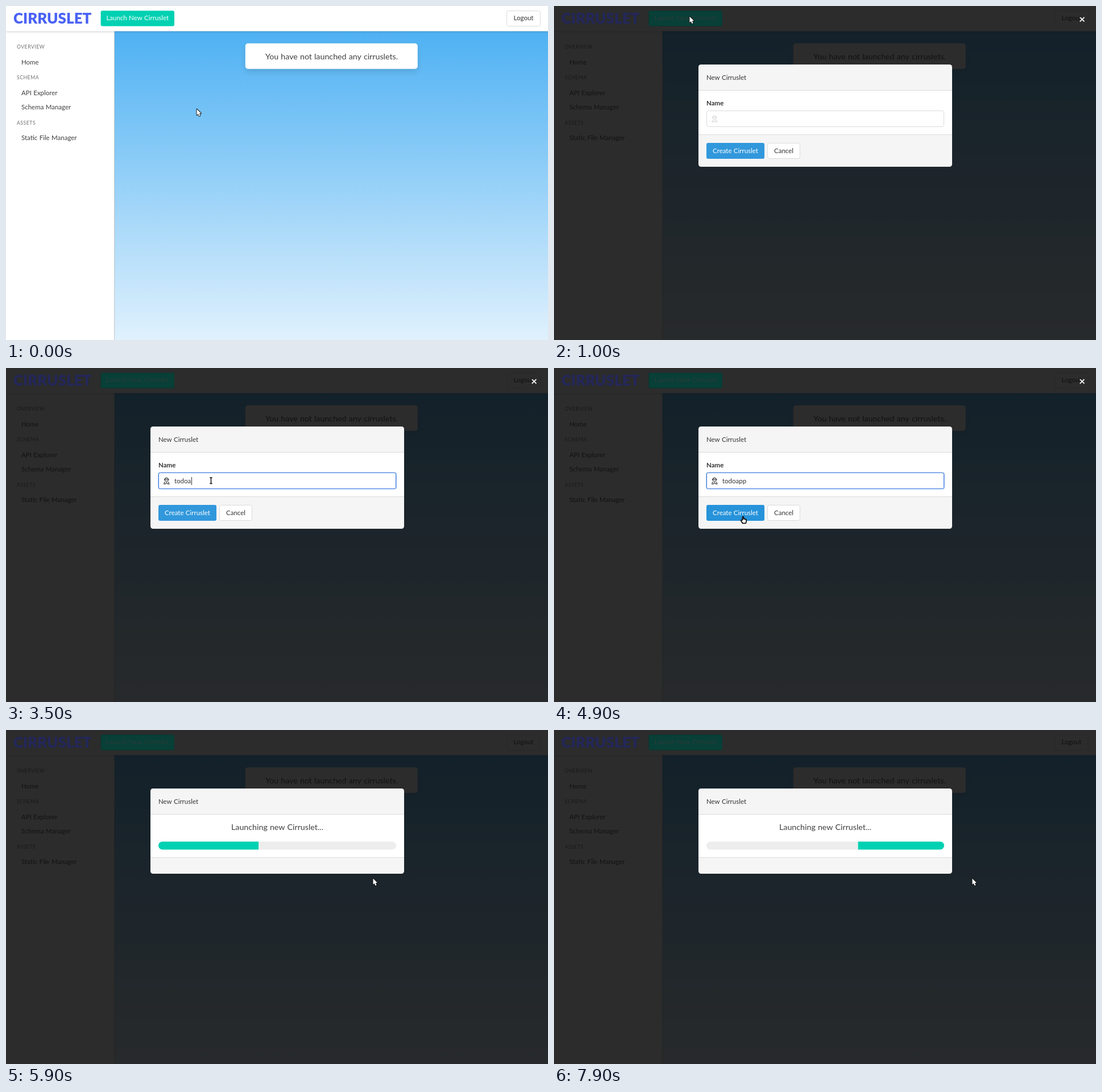
An HTML page with a canvas that plays this animation: 953x588 px, repeating every 8 s.

```html
<!DOCTYPE html>
<html lang="en">
<head>
<meta charset="utf-8">
<title>Launch dialog</title>
<style>
  html, body { margin: 0; width: 100%; height: 100%; overflow: hidden; background: #fff; }
  canvas { display: block; width: 953px; height: 588px; }
</style>
</head>
<body>
<canvas id="stage" width="953" height="588"></canvas>
<script>
const ctx = document.getElementById('stage').getContext('2d');
const W = 953, H = 588, LOOP = 8000, STEP = 100;
const BODY = 11.5, LARGE = 14.25;
const TEAL = '#00d1b2', LINE = '#dbdbdb', INK = '#404040', DARK = '#333', PANEL = '#f5f5f5';

const OPEN = 1000, FOCUS = 2000, CARET_OFF = 4200, LAUNCH = 5200;
const NAME = 'todoapp';
const KEY_TIMES = [2900, 3100, 3200, 3300, 3500, 3600, 3800];

// Pointer path: time, x, y
const PATH = [
  [0, 335, 181], [100, 331, 175], [300, 290, 105], [500, 250, 35], [700, 238, 18],
  [1100, 238, 18], [1300, 305, 110], [1500, 360, 198],
  [4400, 360, 198], [4700, 338, 266], [4900, 332, 261],
  [5500, 332, 261], [5600, 375, 261], [5800, 570, 262], [5900, 645, 261],
  [6100, 705, 262], [6400, 731, 262], [6600, 736, 261], [7000, 736, 261], [7900, 735, 261]
];

function pointerAt(t) {
  const i = PATH.findIndex(p => p[0] > t);
  if (i < 0) return PATH[PATH.length - 1].slice(1);
  const [t0, x0, y0] = PATH[i - 1], [t1, x1, y1] = PATH[i];
  const k = (t - t0) / (t1 - t0);
  return [x0 + (x1 - x0) * k, y0 + (y1 - y0) * k];
}

const inside = ([px, py], x, y, w, h) => px >= x && px <= x + w && py >= y && py <= y + h;

function text(str, x, y, { size = BODY, color = INK, weight = 400, align = 'left', spacing = 0 } = {}) {
  ctx.font = `${weight} ${size}px Lato, sans-serif`;
  ctx.letterSpacing = spacing + 'px';
  ctx.wordSpacing = '0.4px';
  ctx.textAlign = align;
  ctx.fillStyle = color;
  ctx.fillText(str, x, y);
}

function box(x, y, w, h, r, fill, stroke) {
  ctx.beginPath();
  ctx.roundRect(x, y, w, h, r);
  if (fill) { ctx.fillStyle = fill; ctx.fill(); }
  if (stroke) { ctx.strokeStyle = stroke; ctx.lineWidth = 1; ctx.stroke(); }
}

function rect(x, y, w, h, fill) {
  ctx.fillStyle = fill;
  ctx.fillRect(x, y, w, h);
}

function shadowed(color, blur, dy, draw) {
  ctx.save();
  ctx.shadowColor = color;
  ctx.shadowBlur = blur;
  ctx.shadowOffsetY = dy;
  draw();
  ctx.restore();
}

function brand(color) {
  text('CIRRUSLET', 13, 31, { size: 26, weight: 900, color });
}

function launchButton(fill, color) {
  box(166.6, 8.3, 129.4, 27.2, 3, fill);
  text('Launch New Cirruslet', 231.3, 25, { color, align: 'center' });
}

function drawPage(t, pointer) {
  const sky = ctx.createLinearGradient(0, 44, 0, H);
  sky.addColorStop(0, '#4eb1f3');
  sky.addColorStop(1, '#e0f1fd');
  rect(190, 44, W - 190, H - 44, sky);

  shadowed('rgba(10,10,10,.12)', 12, 5, () => box(420.8, 65.8, 303, 44.9, 4.6, '#fff'));
  text('You have not launched any cirruslets.', 572.5, 93.5, { size: LARGE, align: 'center' });

  shadowed('rgba(10,10,10,.15)', 3, 0, () => rect(0, 44, 190, H - 44, '#fff'));
  rect(190, 44, 1, H - 44, '#c9c9c9');
  const label = { size: 8.6, color: '#707070', spacing: 0.55 };
  text('OVERVIEW', 19, 75, label);
  text('Home', 27, 102.5);
  text('SCHEMA', 19, 129, label);
  text('API Explorer', 27, 157);
  text('Schema Manager', 27, 182);
  text('ASSETS', 19, 208.5, label);
  text('Static File Manager', 27, 236);

  shadowed('rgba(10,10,10,.25)', 4, 1, () => rect(0, 0, W, 44.4, '#fff'));
  brand('#4a62f5');
  const hover = inside(pointer, 166, 8, 130, 28);
  launchButton(t >= 900 ? '#06b89d' : hover ? '#00c4a7' : TEAL, '#fff');
  box(880.5, 8.5, 59, 27, 3, '#fff', LINE);
  text('Logout', 910, 25, { color: DARK, align: 'center' });
}

function drawShade() {
  rect(0, 0, W, H, 'rgba(10,10,10,.86)');
  brand('#24285a');
  launchButton('#083f37', '#2c3b39');
}

function drawCard(bottom, footerTop) {
  box(254, 103, 446, bottom - 103, 4.5, PANEL);
  rect(254, 148, 446, footerTop - 148, '#fff');
  rect(254, 148, 446, 1, LINE);
  rect(254, footerTop, 446, 1, LINE);
  text('New Cirruslet', 268, 130, { color: DARK });
}

function drawAstronaut(color) {
  ctx.save();
  ctx.translate(282.3, 198.5);
  ctx.strokeStyle = ctx.fillStyle = color;
  ctx.lineWidth = 1.2;
  ctx.beginPath();
  ctx.arc(0, -2, 3.1, 0, Math.PI * 2);
  ctx.moveTo(-2.8, -2.4);
  ctx.lineTo(2.8, -2.4);
  ctx.stroke();
  ctx.fillRect(-4.2, -3.2, 1.2, 2.2);
  ctx.fillRect(3, -3.2, 1.2, 2.2);
  ctx.beginPath();
  ctx.moveTo(-2.4, 2);
  ctx.quadraticCurveTo(-4.4, 3, -4.5, 5.6);
  ctx.lineTo(-2, 5.6);
  ctx.lineTo(0, 3.2);
  ctx.lineTo(2, 5.6);
  ctx.lineTo(4.5, 5.6);
  ctx.quadraticCurveTo(4.4, 3, 2.4, 2);
  ctx.stroke();
  ctx.restore();
}

function drawForm(t, pointer) {
  drawCard(283, 226);
  text('Name', 268, 175, { weight: 700, color: DARK });

  const focused = t >= FOCUS;
  if (focused) box(267, 183.5, 420, 30, 4, 'rgba(50,115,220,.45)');
  const border = focused ? '#3f7de0' : inside(pointer, 268, 184, 418, 29) ? '#b5b5b5' : LINE;
  box(268.5, 184.5, 417, 28, 3, '#fff', border);
  drawAstronaut(focused ? INK : LINE);

  const typed = NAME.slice(0, KEY_TIMES.filter(k => k <= t).length);
  text(typed, 296, 203, { color: DARK });
  if (focused && t < CARET_OFF) {
    rect(Math.round(296.5 + ctx.measureText(typed).width), 192, 1, 14, DARK);
  }

  box(268, 241, 102, 28, 3, inside(pointer, 268, 241, 102, 28) ? '#2793da' : '#3298dc');
  text('Create Cirruslet', 319, 259, { color: '#fff', align: 'center' });
  box(375.5, 241.5, 57, 27, 3, '#fff', LINE);
  text('Cancel', 404, 259, { color: DARK, align: 'center' });

  ctx.strokeStyle = '#fff';
  ctx.lineWidth = 1.7;
  ctx.beginPath();
  ctx.moveTo(924.8, 19.8); ctx.lineTo(932.4, 27.4);
  ctx.moveTo(932.4, 19.8); ctx.lineTo(924.8, 27.4);
  ctx.stroke();
}

function drawProgress(t) {
  drawCard(253, 224);
  text('Launching new Cirruslet...', 477, 176, { size: LARGE, align: 'center' });

  // A 45%-wide band sweeps from -100% to +100% of the track every 1.5 s.
  const track = 418, phase = ((t - LAUNCH + 28.4) / 1500) % 1;
  ctx.save();
  box(268, 196.5, track, 14, 7, '#ededed');
  ctx.clip();
  rect(268 + track * (2 * phase - 1), 196, track * 0.45, 15, TEAL);
  ctx.restore();
}

function outline(points) {
  ctx.beginPath();
  points.forEach(([x, y]) => ctx.lineTo(x, y));
  ctx.closePath();
}

const cursors = {
  arrow() {
    outline([[0, 0], [0, 10.6], [2.4, 8.5], [4.1, 12.4], [6, 11.5], [4.4, 7.8], [7.5, 7.5]]);
    ctx.stroke();
    ctx.fill();
  },
  hand() {
    ctx.beginPath();
    ctx.moveTo(-1, 6.8);
    ctx.lineTo(-1, 1);
    ctx.quadraticCurveTo(0, -0.8, 1, 1);
    ctx.lineTo(1, 4.2);
    ctx.quadraticCurveTo(2.2, 3.4, 2.8, 4.6);
    ctx.quadraticCurveTo(4, 4, 4.4, 5.2);
    ctx.quadraticCurveTo(5.8, 4.8, 5.8, 6.6);
    ctx.quadraticCurveTo(5.8, 9.6, 4.6, 11.8);
    ctx.lineTo(-1, 11.8);
    ctx.quadraticCurveTo(-2, 9.4, -3.8, 7.2);
    ctx.quadraticCurveTo(-3.2, 5.4, -1, 6.8);
    ctx.fill();
    ctx.stroke();
  },
  beam() {
    ctx.beginPath();
    ctx.moveTo(-2.2, -5.5); ctx.lineTo(2.2, -5.5);
    ctx.moveTo(0, -5.5); ctx.lineTo(0, 5);
    ctx.moveTo(-2.2, 5); ctx.lineTo(2.2, 5);
    ctx.strokeStyle = '#fff';
    ctx.lineWidth = 3.2;
    ctx.stroke();
    ctx.strokeStyle = '#111';
    ctx.lineWidth = 1.5;
    ctx.stroke();
  }
};

function cursorKind(t, pointer) {
  if (t < 900) return inside(pointer, 166, 8, 130, 28) ? 'hand' : 'arrow';
  if (t < OPEN || t >= LAUNCH) return 'arrow';
  if (inside(pointer, 268, 184, 418, 29)) return 'beam';
  return inside(pointer, 268, 241, 102, 28) ? 'hand' : 'arrow';
}

function drawCursor(t, pointer) {
  ctx.save();
  ctx.translate(pointer[0] + 0.5, pointer[1] + 0.5);
  ctx.fillStyle = '#fff';
  ctx.strokeStyle = '#111';
  ctx.lineWidth = 1.8;
  ctx.lineJoin = 'round';
  cursors[cursorKind(t, pointer)]();
  ctx.restore();
}

function render(t) {
  const pointer = pointerAt(t);
  ctx.clearRect(0, 0, W, H);
  drawPage(t, pointer);
  if (t >= OPEN) {
    drawShade();
    if (t < LAUNCH) drawForm(t, pointer);
    else drawProgress(t);
  }
  drawCursor(t, pointer);
}

const start = performance.now();
function tick() {
  const elapsed = (performance.now() - start) % LOOP;
  render(Math.floor(elapsed / STEP) * STEP);
  requestAnimationFrame(tick);
}
tick();
</script>
</body>
</html>
```
